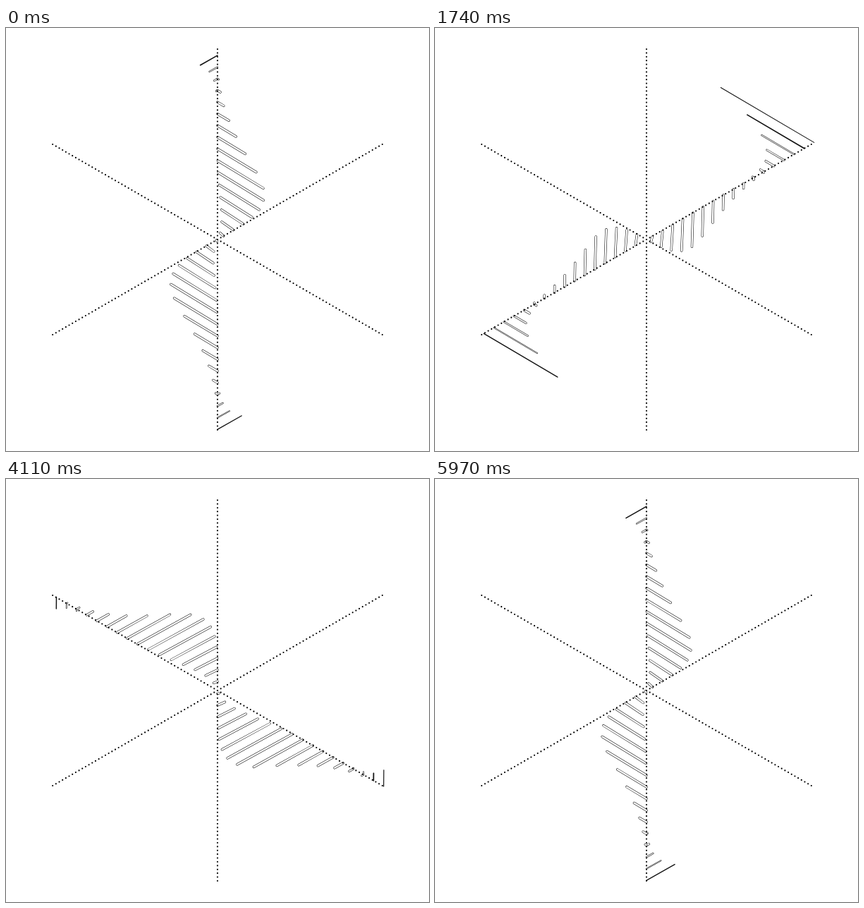
An HTML page with a canvas that plays this animation: 600 by 600 pixels, repeating every 6 s.

```html
<!DOCTYPE html>
<html>
<head>
<meta charset="utf-8">
<style>
  html, body { margin: 0; height: 100%; overflow: hidden; background: #fff; }
  canvas { display: block; }
</style>
</head>
<body>
<canvas id="stage" width="600" height="600"></canvas>
<script>
const ctx = document.getElementById('stage').getContext('2d');
const LOOP = 6000, EDGE_TIME = 2000, EDGES = 100, PITCH = 2.76, LAG = 0.4;

const ease = x => {
  x = Math.min(1, Math.max(0, x));
  return x < 0.5 ? 8 * x ** 4 : 1 - 8 * (1 - x) ** 4;
};
const polar = (r, sector) => {
  const a = (sector * 60 - 90) * Math.PI / 180;
  return [300 + r * Math.cos(a), 300 + r * Math.sin(a)];
};
const mix = (a, b, k) => [a[0] + (b[0] - a[0]) * k, a[1] + (b[1] - a[1]) * k];

// Corners of a hexagonal spiral, from the outside in
const radius = n => PITCH * (EDGES + 0.6 - n);
const corner = n => polar(radius(n), n);

function line(a, b, width, color) {
  ctx.beginPath();
  ctx.moveTo(...a);
  ctx.lineTo(...b);
  ctx.lineWidth = width;
  ctx.strokeStyle = color;
  ctx.stroke();
}

function drawEdge(n, t) {
  const phase = (((t / EDGE_TIME - 0.991 * n + 0.015) % 3) + 3) % 3;
  const head = ease(phase);
  const tail = Math.max(ease(phase - LAG), n ? 0 : 0.1);
  if ((head - tail) * radius(n) < 1) return;
  const from = corner(n), to = corner(n + 1);
  const a = mix(from, to, tail), b = mix(from, to, head);
  const width = Math.min(3.4, 1.1 + (277.7 - radius(n)) * 0.033);
  line(a, b, width, '#111');
  if (width > 1.8) line(a, b, width - 1.1, '#fff');
}

function drawAxes() {
  ctx.fillStyle = '#000';
  for (let axis = 0; axis < 3; axis++) {
    for (let i = -50; i <= 50; i++) {
      ctx.beginPath();
      ctx.arc(...polar(i * 5.4, axis), 1.1, 0, 7);
      ctx.fill();
    }
  }
}

function frame() {
  const t = Math.floor(performance.now() % LOOP / 30) * 30;
  ctx.fillStyle = '#fff';
  ctx.fillRect(0, 0, 600, 600);
  ctx.lineCap = 'round';
  for (let n = 0; n < EDGES; n++) drawEdge(n, t);
  drawAxes();
  requestAnimationFrame(frame);
}
frame();
</script>
</body>
</html>
```
